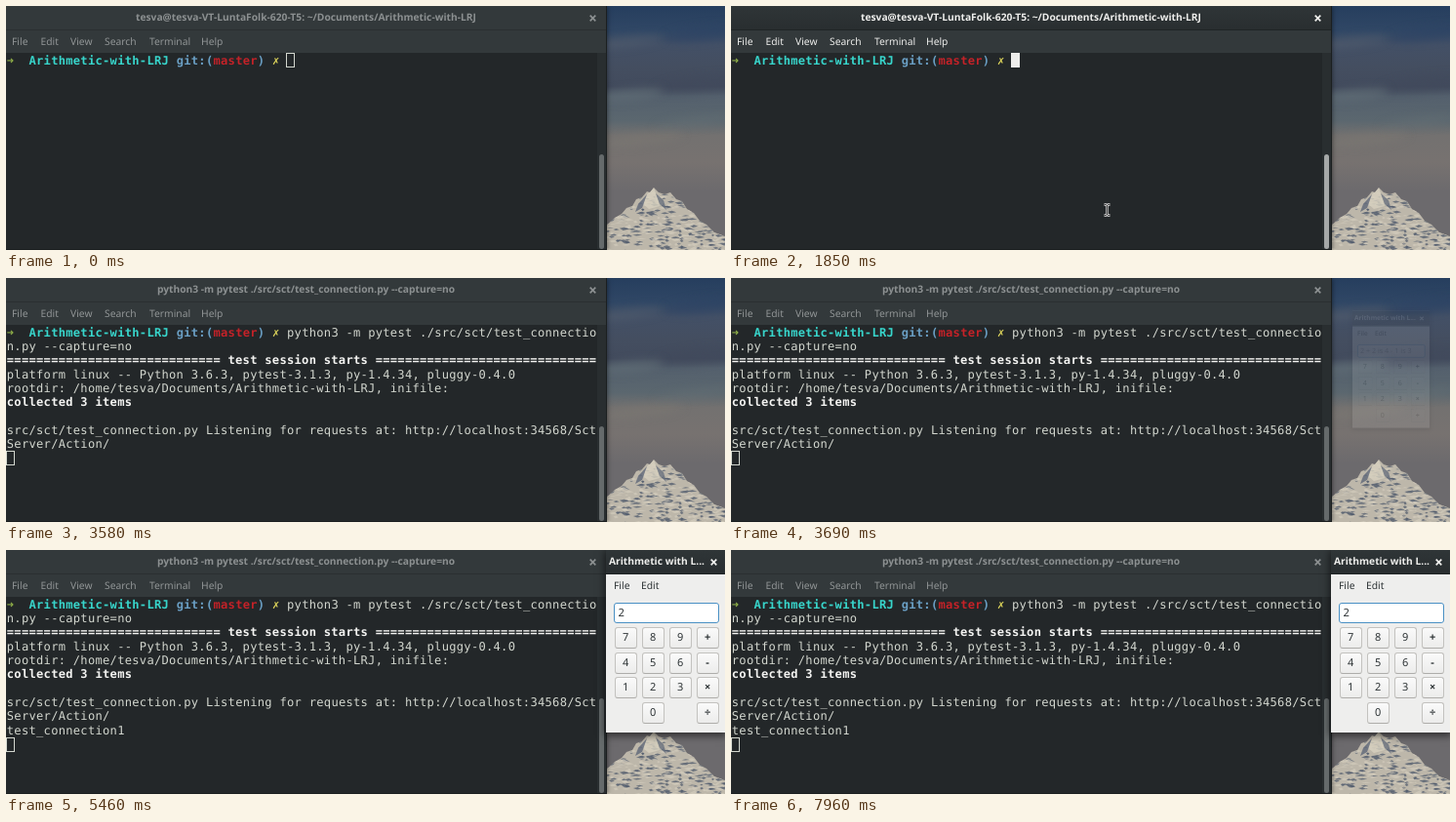
An HTML page with a canvas that plays this animation: 737 px wide and 250 px high, repeating every 8 s.

```html
<!DOCTYPE html>
<html lang="en">
<head>
<meta charset="utf-8">
<title>Terminal test run</title>
<style>
  html, body { margin: 0; width: 100%; height: 100%; overflow: hidden; background: #232729; }
  #stage { position: relative; width: 737px; height: 250px; overflow: hidden;
    font: 10.3px "Noto Sans", "Open Sans", sans-serif; text-rendering: geometricPrecision; white-space: pre; }
  #stage * { position: absolute; box-sizing: border-box; }
  #sky { left: 615px; top: 0; }
  .bar { left: 0; top: 0; width: 100%; height: 25px; line-height: 24px; border-bottom: 1px solid #1f2425;
    background: linear-gradient(#2f3537, #292e30); color: #eeeeec; font-size: 10.25px; font-weight: bold; }
  .close { width: 7px; height: 7px; top: 9px; }
  .close path { fill: none; stroke: currentColor; stroke-width: 1.7; }
  .menu { left: 0; top: 25px; width: 100%; height: 23px; }
  .menu span { line-height: 16px; top: 3.8px; }

  #terminal { left: 0; top: 0; width: 616px; height: 250px; overflow: hidden; background: #232729;
    box-shadow: 0 1px 5px #0008; border-right: 1px solid #1b1f20; border-bottom: 1px solid #1b1f20; }
  #terminal .menu { background: #33393b; color: #eeeeec; }
  #title { left: 0; width: 615px; text-align: center; }
  #terminal .trough { left: 606px; top: 48px; width: 9px; height: 202px; background: #292e30; }
  #terminal .slider { left: 1.9px; top: 104px; width: 5px; height: 97px; border-radius: 3px; background: #a5a8a8; }
  #terminal.idle .bar { background: #33393b; border-color: #2a2f31; color: #8c9091; }
  #terminal.idle .menu { color: #919596; }
  #terminal.idle .slider { background: #656a6b; }
  #grid { left: .8px; top: 48.6px; color: #d3d7cf; font: 12.1px/14.36px "DejaVu Sans Mono", monospace; letter-spacing: .276px; }
  #grid .bold { font-weight: bold; }
  #cursor { width: 9px; height: 15px; margin: -.6px; background: #eeeeec; }
  .idle #cursor { background: none; border: 1px solid #d3d7cf; }

  #calc { left: 615px; top: 0; width: 123px; height: 187px; background: #eeeeed;
    box-shadow: 0 2px 8px 1px #0009; color: #2e3436; }
  #entry { left: 8px; top: 53.5px; width: 108px; height: 21.5px; padding-left: 3.5px; line-height: 19.5px;
    border: 1.2px solid #4a90c4; border-radius: 3px; background: #fff; font-size: 11.2px; }
  .key { width: 23px; height: 22px; line-height: 20px; text-align: center; font-size: 11px;
    border: 1px solid #c3c2bf; border-bottom-color: #aeadaa; border-radius: 3px; background: linear-gradient(#fafafa, #ececeb); }
  .key.op { font-weight: bold; }
  #pointer { width: 9px; height: 14px; }
</style>
</head>
<body>
<div id="stage">
  <canvas id="sky" width="122" height="250"></canvas>
  <div id="terminal">
    <div class="bar"><span id="title"></span>
      <svg class="close" style="left:598px" viewBox="0 0 7 7"><path d="M.7.7l5.6 5.6M6.3.7L.7 6.3"/></svg></div>
    <div class="menu" id="menu"></div>
    <div class="trough"><div class="slider"></div></div>
    <div id="grid"><div id="cursor"></div></div>
  </div>
  <div id="calc">
    <div class="bar"><span style="left:3px">Arithmetic with L...</span>
      <svg class="close" style="left:107px" viewBox="0 0 7 7"><path d="M.7.7l5.6 5.6M6.3.7L.7 6.3"/></svg></div>
    <div class="menu"><span style="left:8px">File</span><span style="left:36px">Edit</span></div>
    <div id="entry"></div>
  </div>
  <svg id="pointer" viewBox="0 0 9 14">
    <path d="M1.5 1.5h2l1 1 1-1h2M4.5 2v10M1.5 12.5h2l1-1 1 1h2" fill="none" stroke="#dcdcdc" stroke-width="2.4"/>
    <path d="M1.5 1.5h2l1 1 1-1h2M4.5 2v10M1.5 12.5h2l1-1 1 1h2" fill="none" stroke="#222" stroke-width=".8"/>
  </svg>
</div>
<script>
const LOOP = 8000, CELL = 7.56, ROW = 14.36;
const $ = id => document.getElementById(id);
const PROJECT = "Arithmetic-with-LRJ";
const COMMAND = "python3 -m pytest ./src/sct/test_connection.py --capture=no";
const T = { pointer: 450, focus: 750, typed: 1900, enter: 2850, session: 3100, collected: 3200,
  listening: 3400, blur: 3500, calc: 3680, test: 4550, digit: 5100 };

function add(parent, text, className, left, top) {
  const el = document.createElement("span");
  el.textContent = text;
  el.className = className;
  el.style.left = left + "px";
  if (top !== undefined) el.style.top = top + "px";
  parent.append(el);
  return el;
}

// [time, row, column, text, colour, bold]
const output = [
  [0, 0, 0, "➜", "#8fae48", 1],
  [0, 0, 3, PROJECT, "#38d6cc", 1],
  [0, 0, 23, "git:(", "#6a9fc4", 1],
  [0, 0, 28, "master", "#c42228", 1],
  [0, 0, 34, ")", "#6a9fc4", 1],
  [0, 0, 36, "✗", "#dcd45a", 1],
  [T.typed, 0, 38, COMMAND.slice(0, 42)],
  [T.typed, 1, 0, COMMAND.slice(42)],
  [T.session, 2, 0, "=".repeat(29) + " test session starts " + "=".repeat(30), "#f4f4f2", 1],
  [T.session, 3, 0, "platform linux -- Python 3.6.3, pytest-3.1.3, py-1.4.34, pluggy-0.4.0"],
  [T.session, 4, 0, `rootdir: /home/tesva/Documents/${PROJECT}, inifile:`],
  [T.collected, 5, 0, "collected 3 items", "#f4f4f2", 1],
  [T.collected, 7, 0, "src/sct/test_connection.py"],
  [T.listening, 7, 27, "Listening for requests at: http://localhost:34568/Sct"],
  [T.listening, 8, 0, "Server/Action/"],
  [T.test, 9, 0, "test_connection1"]
].map(([time, row, col, text, color = "", bold]) => {
  const el = add($("grid"), text, bold ? "bold" : "", col * CELL, row * ROW);
  el.style.color = color;
  return { time, el };
});

// [time, row, column]
const cursorStops = [[0, 0, 38], [T.typed, 1, 17], [T.enter, 2, 0], [T.session, 5, 0],
  [T.collected, 7, 27], [T.listening, 9, 0], [T.test, 10, 0]];

[["File", 6], ["Edit", 35.5], ["View", 66], ["Search", 101], ["Terminal", 147], ["Help", 200]]
  .forEach(([label, x]) => add($("menu"), label, "", x));

["789+", "456-", "123×", " 0 ÷"].forEach((keys, row) => [...keys].forEach((key, col) => {
  if (key !== " ") add($("calc"), key, "key" + (col === 3 ? " op" : ""), 8.6 + col * 28, 79 + row * 25.7);
}));

function paintSky() {
  const g = $("sky").getContext("2d");
  let seed = 7;
  const random = () => (seed = seed * 16807 % 2147483647) / 2147483647;
  const polygon = (color, points) => {
    g.fillStyle = color;
    g.beginPath();
    points.forEach(([x, y]) => g.lineTo(x, y));
    g.fill();
  };
  const gradient = g.createLinearGradient(0, 0, 0, 250);
  [[0, "#263e5e"], [.1, "#304765"], [.16, "#435066"], [.25, "#444e60"], [.33, "#424b5d"], [.37, "#54606d"],
   [.47, "#5b676f"], [.53, "#737170"], [.64, "#777270"], [.76, "#6c6a6d"], [1, "#6c6a6d"]]
    .forEach(([stop, color]) => gradient.addColorStop(stop, color));
  g.fillStyle = gradient;
  g.fillRect(0, 0, 122, 250);

  g.filter = "blur(4px)";
  [[20, 37, 40, 5, "#56616f77"], [100, 28, 40, 7, "#2d446499"], [95, 80, 45, 7, "#414a5c99"],
   [25, 91, 35, 6, "#63707788"], [90, 119, 40, 5, "#66707566"], [35, 137, 45, 6, "#807a7466"]]
    .forEach(([x, y, rx, ry, color]) => {
      g.fillStyle = color;
      g.beginPath();
      g.ellipse(x, y, rx, ry, -.12, 0, 7);
      g.fill();
    });
  g.filter = "none";

  const ridge = [[0, 225], [9, 217], [16, 213], [21, 207], [27, 205], [31, 198], [37, 196], [42, 190],
    [45, 191], [49, 186], [54, 191], [60, 193], [66, 191], [72, 198], [78, 200], [83, 208], [90, 212],
    [96, 220], [103, 224], [111, 232], [122, 236]];
  polygon("#bdb7aa", [...ridge, [122, 250], [0, 250]]);
  g.save();
  g.clip();
  // Dark rock and bright snow lie in near-level ledges.
  for (let i = 0; i < 420; i++) {
    const x = random() * 126 - 4, y = 190 + random() * 60;
    const w = 3 + random() * 8, h = 1 + random() * 2.2;
    const color = random() < .55 ? "#4d586bbb" : "#d3ccbcbb";
    polygon(color, [[x, y + 1], [x + w * .5, y], [x + w, y + h * .6], [x + w * .4, y + h]]);
  }
  polygon("#d8d1c0cc", [[49, 186], [42, 193], [37, 202], [44, 208], [55, 205], [52, 195]]);
  polygon("#566074bb", [[42, 193], [33, 203], [30, 211], [37, 207]]);
  polygon("#566074aa", [[51, 192], [55, 203], [62, 209], [59, 199]]);
  g.restore();
}
paintSky();

function render(t) {
  output.forEach(({ time, el }) => el.style.visibility = t >= time ? "visible" : "hidden");
  const [, row, col] = cursorStops.filter(([time]) => t >= time).pop();
  $("cursor").style.left = col * CELL + "px";
  $("cursor").style.top = row * ROW + "px";

  $("terminal").classList.toggle("idle", t < T.focus || t >= T.blur);
  $("title").textContent = t < T.enter ? `tesva@tesva-VT-LuntaFolk-620-T5: ~/Documents/${PROJECT}` : COMMAND;

  const glide = 1 - Math.min(1, Math.max(0, (t - T.pointer) / 300));
  $("pointer").style.display = t >= T.pointer && t < T.typed ? "" : "none";
  $("pointer").style.left = 381 + 60 * glide ** 3 + "px";
  $("pointer").style.top = 202 + 45 * glide ** 3 + "px";

  const opening = Math.min(1, Math.max(0, (t - T.calc) / 200));
  const eased = 1 - (1 - opening) ** 2;
  $("calc").style.opacity = eased;
  $("calc").style.transform = opening < 1 ? `scale(${.6 + .4 * eased})` : "none";
  $("entry").textContent = t < T.digit ? "2 + 2 is 4 - 1 is 3" : "2";
  $("entry").style.color = t < T.digit ? "#8b8e8f" : "#2e3436";
}

function tick() {
  render(performance.now() % LOOP);
  requestAnimationFrame(tick);
}
tick();
</script>
</body>
</html>
```
